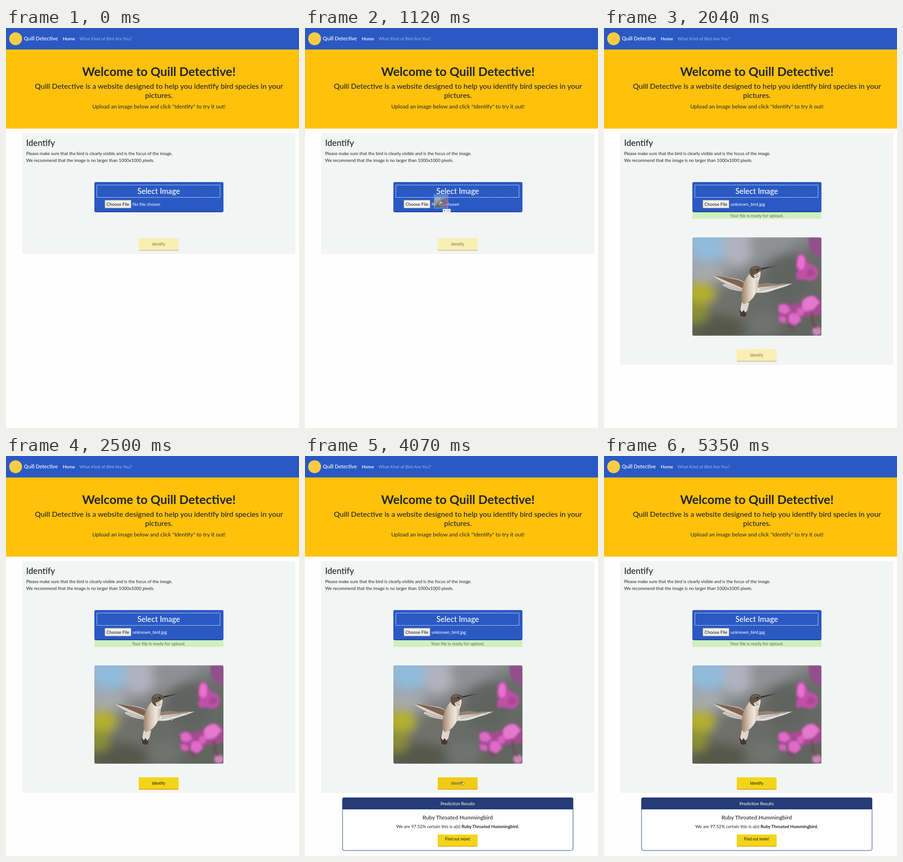
Animation of 640 by 875 pixels, one loop 8000 ms. Source, as an HTML page:

```html
<!DOCTYPE html>
<html lang="en">
<head>
<meta charset="utf-8">
<title>Quill Detective</title>
<style>
  html, body { margin: 0; width: 100%; height: 100%; overflow: hidden; background: #fefefe; }
  svg { display: block; width: 640px; height: 875px; font-family: Lato, "Open Sans", sans-serif; }
  .mid { text-anchor: middle; }
  .med { font-weight: 500; }
</style>
</head>
<body>
<svg viewBox="0 0 640 875" xmlns="http://www.w3.org/2000/svg">
  <defs>
    <linearGradient id="air" x1="0" y1="0" x2="0.7" y2="1">
      <stop offset="0" stop-color="#9db9d0"/>
      <stop offset="0.3" stop-color="#9a9ca0"/>
      <stop offset="0.55" stop-color="#6c6e6d"/>
      <stop offset="1" stop-color="#62645f"/>
    </linearGradient>
    <linearGradient id="body" x1="0" y1="0" x2="1" y2="0">
      <stop offset="0" stop-color="#9a7d63"/>
      <stop offset="0.45" stop-color="#d9cabb"/>
      <stop offset="0.75" stop-color="#efe8df"/>
      <stop offset="1" stop-color="#c4b09c"/>
    </linearGradient>
    <filter id="soft" x="-50%" y="-50%" width="200%" height="200%"><feGaussianBlur stdDeviation="11"/></filter>
    <filter id="haze" x="-30%" y="-30%" width="160%" height="160%"><feGaussianBlur stdDeviation="2"/></filter>
    <clipPath id="frame"><rect width="282" height="215" rx="3.5"/></clipPath>
    <g id="photo" clip-path="url(#frame)">
      <rect width="282" height="215" fill="url(#air)"/>
      <g filter="url(#soft)">
        <ellipse cx="38" cy="20" rx="40" ry="32" fill="#8fbbdd"/>
        <ellipse cx="98" cy="24" rx="32" ry="38" fill="#b0b3be"/>
        <ellipse cx="165" cy="18" rx="42" ry="26" fill="#8f9092"/>
        <ellipse cx="205" cy="88" rx="48" ry="52" fill="#616360"/>
        <ellipse cx="30" cy="76" rx="40" ry="18" fill="#a4abae"/>
        <ellipse cx="85" cy="145" rx="34" ry="30" fill="#6f716a"/>
        <ellipse cx="55" cy="200" rx="62" ry="30" fill="#55594a"/>
        <ellipse cx="18" cy="122" rx="32" ry="26" fill="#b5b02c"/>
        <ellipse cx="10" cy="165" rx="24" ry="24" fill="#8b9034"/>
        <ellipse cx="155" cy="190" rx="38" ry="30" fill="#70726e"/>
      </g>
      <g filter="url(#haze)">
        <path d="M254 0H282V46Q262 38 255 22z" fill="#93508c"/>
        <path d="M235 37q10-5 13 8 2 12 12 15 17 4 14 22-7 16-22 12-10-4-22-1-8-9 1-20-8-7-3-18-1-16 7-18z" fill="#c050a9"/>
        <path d="M236 39q8-1 10 12l-2 17-9 3-6-10q0-18 7-22z" fill="#e86fd1"/>
        <path d="M252 70q12-4 18 8-8 12-20 6z" fill="#a8488f"/>
        <path d="M188 150q10-10 24-2 12-3 26-6 10-18 30-14 10 3 14 14v27l-18 2-24 4-14 19-15-4-3-12-18-7q-5-10-2-21z" fill="#a64c90"/>
        <path d="M188 151q10-9 20-1l6 10-10 8-14-4zM212 168q10-6 20 2l6 12-14 10-14-8z" fill="#e06bc9"/>
        <path d="M240 140q10-14 26-11l12 13-14 16-16 4-8-9z" fill="#e478cf"/>
        <path d="M230 156q10-6 16 4l-6 12-12-4zM188 174q10-4 18 4l-2 10-14-3z" fill="#d860bd"/>
        <circle cx="272" cy="205" r="10" fill="#cf86bd"/>
        <path d="M209 190q8 10 15 7M262 165q-3 24 10 34" fill="none" stroke="#6d4757" stroke-width="4"/>
      </g>
      <path d="M124 110Q112 92 92 90L45 83Q56 94 73 101 62 103 69 107 86 117 118 119z" fill="#d8d2cb"/>
      <path d="M124 110Q112 94 90 91L45 83Q74 95 116 114z" fill="#80624f"/>
      <path d="M141 104Q163 98 181 102L219 101Q201 109 182 114 160 123 139 121z" fill="#e2e0dc"/>
      <path d="M141 104Q163 98 181 102L219 101Q180 107 142 110z" fill="#97806f"/>
      <path d="M70 102L112 115M66 106L110 117M146 117L190 107M146 113L204 104" fill="none" stroke="#8f8278" stroke-width="0.9"/>
      <path d="M108 141L103 168Q108 177 117 173L124 143z" fill="#e0d6cb"/>
      <path d="M103 157l1 13q5 6 13 3l3-14-4 6-4-6-4 5z" fill="#433a35"/>
      <path d="M128 77Q111 92 108 120 105 139 112 146 127 143 137 125 147 110 145 82z" fill="url(#body)"/>
      <path d="M126 82Q121 65 137 62.5 150 63 152 70 149 82 143 90 133 92 126 82z" fill="#5f5345"/>
      <path d="M134 82q9-3 15-9 1 12-5 24-8-3-10-15z" fill="#e4dcd2"/>
      <path d="M137 84l7-3M138 88l7-3M130 69q7-4 14-1" fill="none" stroke="#8c7a68" stroke-width="1.2"/>
      <path d="M151 67.5L183 62 152 70.5z" fill="#28282a"/>
      <circle cx="142" cy="71" r="1.8" fill="#17171a"/>
    </g>
  </defs>

  <rect width="640" height="875" fill="#fefefe"/>
  <rect width="640" height="47" fill="#2a59c4"/>
  <circle cx="21" cy="23.5" r="14" fill="#f7cc45"/>
  <g fill="#fff">
    <text x="39" y="26.5" font-size="11.2" class="med">Quill Detective</text>
    <text x="124" y="27" font-size="10" font-weight="600">Home</text>
    <text x="160.5" y="27" font-size="9.6" fill-opacity="0.55">What Kind of Bird Are You?</text>
  </g>

  <rect y="47" width="640" height="173" fill="#ffc10a"/>
  <g fill="#212529" class="mid">
    <text x="334" y="104.5" font-size="26.6" font-weight="700">Welcome to Quill Detective!</text>
    <g font-size="16.1" class="med">
      <text x="334" y="132.5">Quill Detective is a website designed to help you identify bird species in your</text>
      <text x="334" y="153">pictures.</text>
    </g>
    <text x="334" y="175.5" font-size="12.05">Upload an image below and click "Identify" to try it out!</text>
  </g>

  <rect id="card" x="35" y="230" width="597" height="264.5" rx="4" fill="#f3f5f4"/>
  <g fill="#212529">
    <text x="44" y="257.5" font-size="18.5" class="med">Identify</text>
    <g font-size="9.62">
      <text x="44" y="278">Please make sure that the bird is clearly visible and is the focus of the image.</text>
      <text x="44" y="293">We recommend that the image is no larger than 1000x1000 pixels.</text>
    </g>
  </g>

  <g id="ready">
    <rect x="193" y="403" width="282" height="14.5" fill="#cff0bd"/>
    <text x="333.5" y="413.5" font-size="9.6" fill="#56764f" class="mid">Your file is ready for upload.</text>
  </g>
  <rect x="193" y="337" width="282" height="66" rx="4" fill="#173d98"/>
  <rect x="193" y="337" width="282" height="64.3" rx="4" fill="#2a59c4"/>
  <rect x="198.5" y="343.5" width="269" height="27" fill="none" stroke="#fff" stroke-dasharray="2.6 1.4"/>
  <text x="333.5" y="363" font-size="16.7" fill="#fff" class="mid med">Select Image</text>
  <rect id="choose" x="215.9" y="376.4" width="57.4" height="17.6" rx="1" fill="#efefef" stroke="#767676" stroke-width="0.8"/>
  <text x="244.5" y="388.7" font-size="9.7" fill="#111" class="mid">Choose File</text>
  <text id="file" x="276.5" y="388.7" font-size="9.65" fill="#fff"></text>

  <use id="preview" href="#photo" x="193" y="458"/>

  <g id="btn">
    <rect id="edge" width="87" height="27" rx="2"/>
    <rect id="face" width="87" height="25" rx="2"/>
    <text id="label" x="43.5" y="15.8" font-size="8.6" class="mid">Identify</text>
  </g>

  <g id="wait">
    <text x="333.5" y="714" font-size="9.6" fill="#212529" class="mid">Processing your image. Please wait...</text>
    <circle id="spin" cx="333.5" cy="738" r="9" fill="none" stroke="#212529" stroke-width="2.6" pathLength="4" stroke-dasharray="3 1"/>
  </g>

  <g id="result">
    <rect x="82" y="747.5" width="503.5" height="115.5" rx="4" fill="#fff" stroke="#263c78"/>
    <path d="M81.5 773V751q0-4 4-4H582q4 0 4 4V773z" fill="#263c78"/>
    <g class="mid" fill="#212529">
      <text x="333.5" y="763.5" font-size="9.55" fill="#fff">Prediction Results</text>
      <text x="333.5" y="795" font-size="12.1" class="med">Ruby Throated Hummingbird</text>
      <text x="333.5" y="814" font-size="9.6">We are 97.52% certain this is a(n) <tspan font-weight="700">Ruby Throated Hummingbird.</tspan></text>
    </g>
    <rect x="290" y="828" width="87" height="26.5" rx="2" fill="#e5a312"/>
    <rect x="290" y="828" width="87" height="24.8" rx="2" fill="#f2d518"/>
    <text x="333.5" y="841.3" font-size="8.5" fill="#111" class="mid">Find out more!</text>
  </g>

  <g id="ghost">
    <rect width="32" height="32" fill="#a9c4e6" opacity="0.38"/>
    <use href="#photo" transform="translate(2 8) scale(0.1)" opacity="0.8"/>
    <rect x="20" y="33" width="17" height="7" fill="#fff" stroke="#b8bcc4" stroke-width="0.5"/>
    <path d="M22 36.5h3M23.5 35v3" stroke="#2a59c4" stroke-width="0.9"/>
    <text x="26.5" y="38" font-size="4" fill="#27408c">Copy</text>
  </g>

  <g id="cursor" stroke-linejoin="round">
    <path id="arrow" d="M0 0V5.6L1.3 4.5 2.2 6.4 3.1 6 2.3 4.1H4z" fill="#fff" stroke="#222" stroke-width="0.5"/>
    <path id="hand" d="M0 0.4Q0.8-0.3 1.1 0.5V2.5L3.6 3.1V5L2.9 6.6H0.5L-1.2 4.2-0.7 3.6 0 4z" fill="#fff" stroke="#222" stroke-width="0.5"/>
    <path id="beam" d="M-1 0H1M0 0V6.5M-1 6.5H1" fill="none" stroke="#222" stroke-width="0.6"/>
  </g>
</svg>
<script>
const LOOP = 8000;
const DROP = 1850, PREVIEW = 2040, HOVER = 2850, CLICK = 3040, DONE = 3940, LEAVE = 4880, EXIT = 5320;

const el = id => document.getElementById(id);
const show = (id, on) => el(id).setAttribute('display', on ? 'inline' : 'none');
const set = (id, name, value) => el(id).setAttribute(name, value);
const clamp = v => Math.max(0, Math.min(1, v));
const ease = v => v * v * (3 - 2 * v);
const mix = (a, b, k) => a.map((v, i) => v + (b[i] - v) * k);
const rgb = c => `rgb(${c.map(Math.round)})`;

// each key: time, x, y
const dragPath = [[500, 554, 658], [720, 440, 560], [930, 283, 440], [1120, 281, 363], [1250, 289, 354], [1570, 290, 354]];
const mousePath = [[DROP, 306, 382], [2040, 306, 383], [2280, 312, 450], [2500, 361, 574], [2700, 358, 640],
  [2930, 338, 709], [3520, 338, 709], [4250, 345, 713], [4740, 345, 713], [4950, 367, 738], [5100, 389, 770], [EXIT, 442, 874]];

// face, edge and text colours of the button
const looks = {
  off: [[250, 239, 178], [200, 196, 168], [118, 113, 88]],
  on: [[242, 213, 24], [229, 163, 18], [17, 17, 17]],
  hot: [[235, 160, 14], [242, 213, 24], [255, 255, 255]]
};

function along(path, t) {
  if (t <= path[0][0]) return path[0].slice(1);
  const i = path.findIndex(p => p[0] > t);
  if (i < 0) return path[path.length - 1].slice(1);
  const a = path[i - 1], b = path[i];
  return mix(a.slice(1), b.slice(1), ease((t - a[0]) / (b[0] - a[0])));
}

function buttonLook(t) {
  const fade = (from, to, start, span) => {
    const k = ease(clamp((t - start) / span));
    return looks[from].map((c, i) => mix(c, looks[to][i], k));
  };
  if (t < HOVER) return fade('off', 'on', PREVIEW, 300);
  if (t < DONE) return fade('on', 'hot', HOVER, 300);
  if (t < LEAVE) return fade('on', 'hot', DONE, 450);
  return fade('hot', 'on', LEAVE, 430);
}

function draw(t) {
  const picked = t >= DROP, seen = t >= PREVIEW;
  const busy = t >= CLICK && t < DONE, done = t >= DONE;

  el('file').textContent = picked ? 'unknown_bird.jpg' : 'No file chosen';
  show('ready', picked);
  show('preview', seen);
  show('wait', busy);
  show('result', done);
  show('btn', !busy);

  const top = seen ? 703 : picked ? 487.3 : 460.3;
  set('card', 'height', busy ? 530 : top + 34.3 - 230);
  set('btn', 'transform', `translate(290 ${top})`);
  const look = buttonLook(t);
  ['face', 'edge', 'label'].forEach((id, i) => set(id, 'fill', rgb(look[i])));
  set('spin', 'transform', `rotate(${118 + (t - 3520) / 750 * 360} 333.5 738)`);

  const dragging = t >= 500 && t < DROP;
  show('ghost', dragging);
  set('ghost', 'transform', `translate(${along(dragPath, t)})`);
  set('choose', 'fill', t > 1060 && t < DROP ? '#f5f5f5' : '#efefef');

  const overButton = !busy && t > HOVER && t < LEAVE;
  show('cursor', picked && t < EXIT);
  set('cursor', 'transform', `translate(${along(mousePath, t)})`);
  show('arrow', !busy && !overButton);
  show('hand', overButton);
  show('beam', busy);
}

function tick() {
  draw(performance.now() % LOOP);
  requestAnimationFrame(tick);
}
tick();
</script>
</body>
</html>
```
